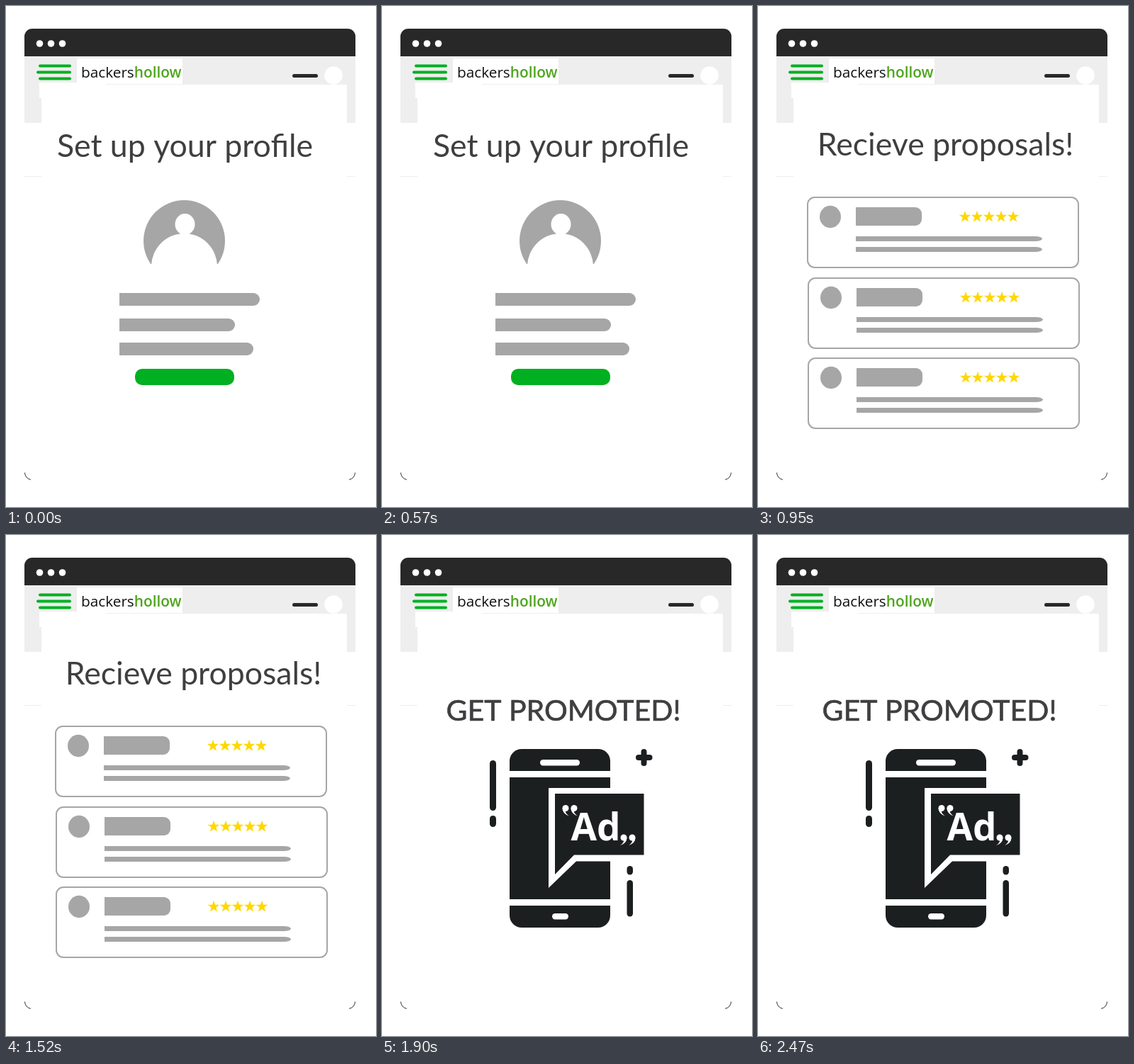
These frames come from a looping animation (522 px wide and 707 px high, 2850 ms). An HTML page with a canvas:

```html
<!DOCTYPE html>
<html lang="en">
<head>
<meta charset="utf-8">
<title>Profile, proposals, promotion</title>
<style>
  html, body { margin: 0; width: 100%; height: 100%; overflow: hidden; background: #fff; }
  canvas { display: block; }
</style>
</head>
<body>
<canvas id="stage" width="522" height="707"></canvas>
<script>
const ctx = document.getElementById('stage').getContext('2d');
const HOLD = 950;
const GRAY = '#a6a6a6', GREEN = '#00b020', DARK = '#282828', INK = '#1c1f20', WHITE = '#fff';
const TITLE = '#3f3f41';

function box(x1, y1, x2, y2, color, radius = 0) {
  ctx.fillStyle = color;
  ctx.beginPath();
  ctx.roundRect(x1, y1, x2 - x1, y2 - y1, radius);
  ctx.fill();
}

function oval(x, y, rx, color, ry = rx) {
  ctx.fillStyle = color;
  ctx.beginPath();
  ctx.ellipse(x, y, rx, ry, 0, 0, Math.PI * 2);
  ctx.fill();
}

function shape(points, color) {
  ctx.fillStyle = color;
  ctx.beginPath();
  points.forEach(([x, y]) => ctx.lineTo(x, y));
  ctx.fill();
}

function label(text, x, y, font, color, align = 'center') {
  ctx.font = font;
  ctx.textAlign = align;
  ctx.fillStyle = color;
  ctx.fillText(text, x, y);
}

function heading(text, x, y, size = 44.6) {
  label(text, x, y, `${size}px Carlito, Lato, sans-serif`.replace('Carlito, ', ''), TITLE);
}

function star(x, y, r) {
  const points = Array.from({ length: 10 }, (_, i) => {
    const a = i * Math.PI / 5 - Math.PI / 2;
    const d = i % 2 ? r * 0.4 : r;
    return [x + d * Math.cos(a), y + d * Math.sin(a)];
  });
  shape(points, '#ffd800');
}

function comma(x, y, side) {
  ctx.save();
  ctx.translate(x, y);
  ctx.scale(side, 1);
  oval(0, 0, 4.5, WHITE);
  ctx.beginPath();
  ctx.moveTo(4.5, 0);
  ctx.quadraticCurveTo(4.5, 8, -5, 11);
  ctx.quadraticCurveTo(1, 7, 0, 3);
  ctx.fill();
  ctx.restore();
}

function browser() {
  box(0, 0, 522, 707, WHITE);
  box(26, 71, 493, 165, '#eee');
  box(47, 108, 141, 130, WHITE);
  box(50, 111, 481, 166, WHITE);
  box(26, 32, 493, 71, DARK, [11, 11, 0, 0]);
  for (const x of [47.5, 63.5, 79.5]) oval(x, 53, 4.8, WHITE);

  box(46, 82.5, 92, 86.5, GREEN, 2);
  box(43, 91.5, 92, 95.5, GREEN, 2);
  box(46, 100.5, 92, 104.5, GREEN, 2);
  box(100, 74, 249, 110, WHITE);
  const family = '20.8px "Open Sans", "Noto Sans", sans-serif';
  label('backers', 106, 101, family, '#111', 'left');
  const split = 106 + ctx.measureText('backers').width;
  label('hollow', split, 101, '600 ' + family, '#4ea51f', 'left');

  box(404, 96, 440, 101, DARK, 2.5);
  oval(462, 98, 12.7, WHITE);
  box(26, 240, 50, 241, '#eee');
  box(481, 240, 493, 241, '#eee');

  ctx.strokeStyle = '#333';
  ctx.lineWidth = 1;
  ctx.beginPath();
  ctx.arc(36.5, 658.5, 10, Math.PI * 0.55, Math.PI);
  ctx.moveTo(492.5, 658.5);
  ctx.arc(482.5, 658.5, 10, 0, Math.PI * 0.45);
  ctx.stroke();
}

function profile() {
  heading('Set up your profile', 252.5, 212.5);

  ctx.save();
  ctx.beginPath();
  ctx.rect(190, 270, 125, 94);
  ctx.clip();
  oval(251.5, 331.5, 57.5, GRAY);
  oval(251.5, 368, 46.5, WHITE, 47);
  oval(252.5, 308, 14, WHITE, 15);
  box(246, 318, 259, 326, WHITE);
  ctx.restore();

  for (const [right, y] of [[358, 405], [323, 441], [349, 475]]) {
    box(160, y, right, y + 18, GRAY, [0, 9, 9, 0]);
  }
  box(182, 512, 322, 535, GREEN, 10);
}

function card(dx, dy) {
  ctx.save();
  ctx.translate(dx, dy);
  ctx.strokeStyle = GRAY;
  ctx.lineWidth = 2;
  ctx.beginPath();
  ctx.roundRect(70, 270, 382, 99, 10);
  ctx.stroke();
  oval(102, 297.5, 15, GRAY, 15.7);
  box(138, 284, 231, 310, GRAY, [0, 9, 9, 0]);
  for (let i = 0; i < 5; i++) star(292 + i * 17, 297.5, 8.7);
  for (const y of [325, 340]) {
    box(138, y, 401, y + 7, GRAY, [0, { x: 10, y: 3.5 }, { x: 10, y: 3.5 }, 0]);
  }
  ctx.restore();
}

function proposals() {
  heading('Recieve proposals!', 264.5, 210.5);
  card(0, 0);
  card(1, 114);
  card(1, 227);
}

function promotion() {
  heading('GET PROMOTED!', 256, 261.5, 41);
  ctx.strokeStyle = TITLE;
  ctx.lineWidth = 0.7;
  ctx.strokeText('GET PROMOTED!', 256, 261.5);

  box(180, 302, 322, 554, INK, 17);
  box(180, 333, 322, 342, WHITE);
  box(180, 514, 322, 523, WHITE);
  box(223, 317, 279, 325.5, WHITE, 4.2);
  box(240, 534, 263, 542.5, WHITE, 4.2);

  shape([[235, 357], [323, 357], [323, 460.5], [274, 460.5], [235, 498]], WHITE);
  shape([[244, 365], [369.5, 365], [369.5, 451.5], [271, 451.5], [244, 479]], INK);
  label('Ad', 301.5, 431, 'bold 53px "Open Sans", "Noto Sans", sans-serif', WHITE);
  comma(259, 385.5, -1);
  comma(271, 385.5, -1);
  comma(341, 427, 1);
  comma(353, 427, 1);

  box(152, 318, 161, 389, INK, 4.5);
  box(152, 396, 161, 412, INK, 4.5);
  box(345.5, 467, 354, 479.5, INK, 4.2);
  box(345.5, 487, 354, 538.5, INK, 4.2);
  box(358, 310, 381.5, 318, INK, 4);
  box(365.5, 302, 373.5, 326, INK, 4);
}

const scenes = [profile, proposals, promotion];

function render(now) {
  browser();
  scenes[Math.floor(now / HOLD) % scenes.length]();
}

const start = performance.now();
function tick() {
  render(performance.now() - start);
  requestAnimationFrame(tick);
}
tick();
</script>
</body>
</html>
```
